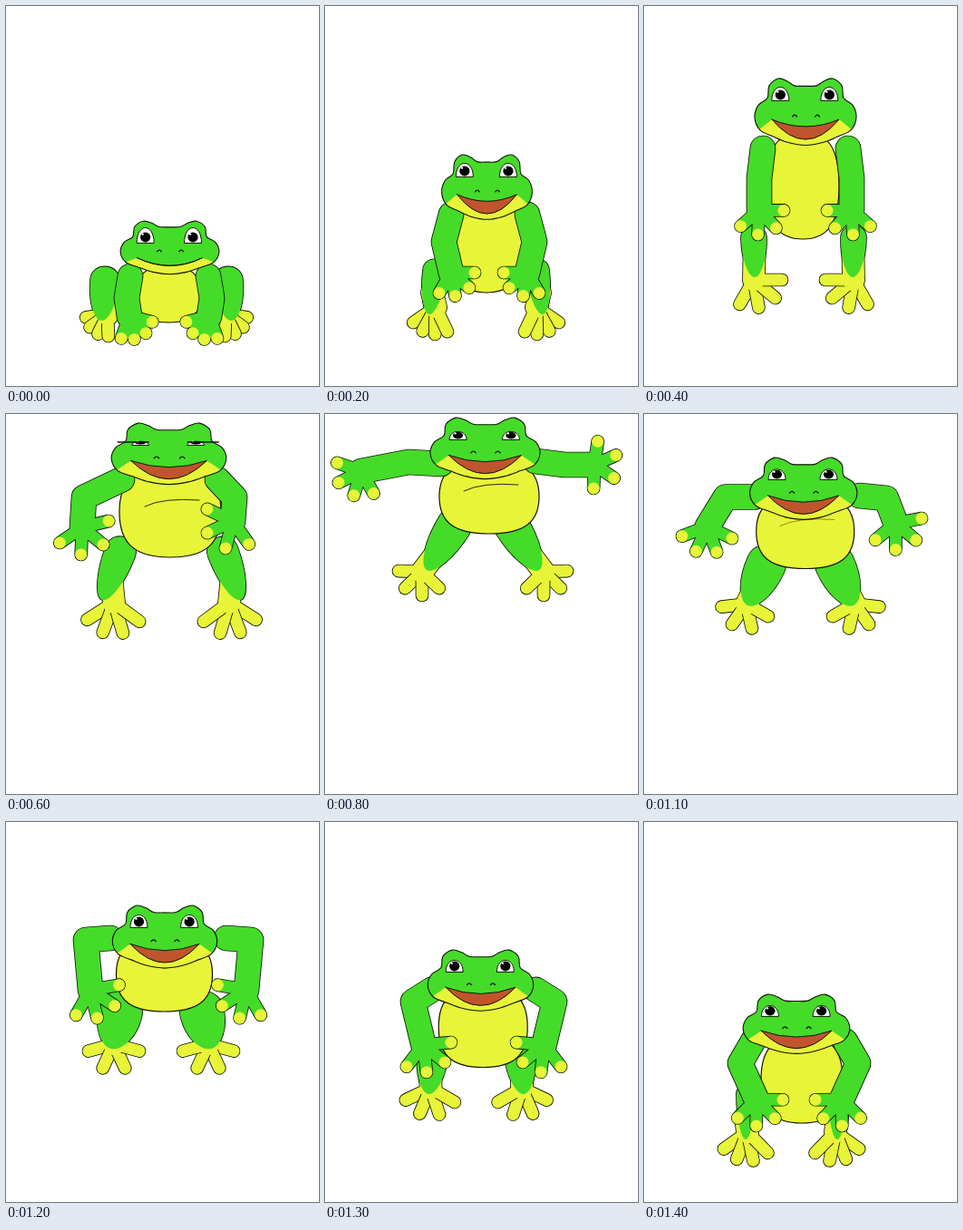
These frames come from a looping animation (345 px wide and 419 px high, 1500 ms). An HTML page:

```html
<!DOCTYPE html>
<html lang="en">
<head>
<meta charset="utf-8">
<title>Jumping frog</title>
<style>
html, body { margin: 0; width: 100%; height: 100%; overflow: hidden; background: #fff; }
svg { display: block; width: 100%; height: 100%; }
</style>
</head>
<body>
<svg id="stage" viewBox="0 0 345 419" stroke-linecap="round" stroke-linejoin="round"></svg>
<script>
const GREEN = '#45db29', YELLOW = '#e8f438', RED = '#c0542d', INK = '#101408';
const LOOP = 1500, STEP = 100, EDGE = 1.7;
const ARM = 27, SHIN = 24, DIGIT = 13;

// head: centre x, top y, x scale, y scale, mouth opening, eye height
// body: centre x, y, radius x, y        axes: mirror line of arms, of legs
// arm: shoulder, elbow, wrist, then the finger fan (angle, spread, length)
// leg: hip, thigh tip, ankle, then the toe fan, thigh half width
// The right limbs mirror the left ones unless given.
const squat = { t: 0, axes: [180, 177], head: [180.5, 238, .97, .78, 0, 17], body: [179, 318, 36, 31],
  arm: [137,298, 133,322, 136,342, 62, 32, 26],
  leg: [109,303, 105,347, 112,340, 130, 28, 24, 16] };
const rise = { t: 200, axes: [181, 177.5], head: [178.5, 165, .89, .95, 1, 15], body: [178, 262, 40, 54],
  arm: [139,230, 131,260, 139,294, 60, 40, 26],
  leg: [121,292, 115,340, 122,332, 105, 27, 30, 13] };
const stretch = { t: 400, axes: [178, 176], head: [178, 81, 1, .98, 1, 15], body: [175, 198, 40, 59],
  arm: [131,157, 127,190, 127,225, 70, 46, 27],
  leg: [121,256, 122,299, 121,302, 60, 40, 31, 14] };
const leap = { t: 600, axes: [180, 182.5], head: [179.5, 11, 1.13, .9, 1, 4], body: [181, 108, 56, 50], fold: 1,
  arm: [128,72, 86,92, 84,125, 66, 53, 30],
  armR: [233,72, 252,92, 250,118, 50, 50, 31],
  leg: [126,152, 106,205, 119,208, 92, 37, 35, 17] };
const apex = { t: 1000, axes: [174, 174], head: [176.5, 5, 1.08, .9, 1, 9], body: [181, 91, 55, 41], fold: 1,
  arm: [128,55, 92,53, 47,63, 130, 46, 28],
  armR: [232,52, 264,56, 290,56, 175, 58, 26],
  leg: [143,122, 112,172, 107,174, 113, 46, 26, 19] };
const fall = { t: 1200, axes: [179, 171], head: [175, 93, 1.03, .92, 1, 14], body: [174.5, 168, 53, 41],
  arm: [115,128, 88,130, 93,185, 55, 43, 32],
  leg: [126,210, 116,250, 119,245, 90, 50, 29, 24] };
const land = { t: 1400, axes: [171, 162.5], head: [168, 191, 1.05, .87, 1, 12], body: [174, 284, 45, 48],
  arm: [120,242, 106,266, 124,306, 68, 45, 29],
  leg: [112,300, 112,350, 114,342, 95, 33, 32, 10] };

const mirror = (limb, axis) => limb.map((v, i) => i < 6 && i % 2 === 0 ? 2 * axis - v : v);
const poses = [squat, rise, stretch, leap, { ...apex, t: 800, reach: 7 }, apex, fall, land].map(p => ({
  ...p, extra: [p.fold || 0, p.reach || 0],
  armR: p.armR || mirror(p.arm, p.axes[0]),
  legR: mirror(p.leg, p.axes[1])
}));

const stage = document.getElementById('stage');
function add(tag, attrs, parent = stage) {
  const el = document.createElementNS('http://www.w3.org/2000/svg', tag);
  set(el, attrs);
  return parent.appendChild(el);
}
function set(el, attrs) {
  for (const k in attrs) el.setAttribute(k, attrs[k]);
}
const draw = (el, d) => set(el, { d });
const fill = color => add('path', { fill: color });
const line = (color, width) => add('path', { fill: 'none', stroke: color, 'stroke-width': width });
const inked = (color, width) => add('path', { fill: color, stroke: INK, 'stroke-width': width });
const pt = (x, y) => `${x.toFixed(2)} ${y.toFixed(2)} `;

// Closed smooth curve through [x, y] points
function curve(pts) {
  const n = pts.length, at = i => pts[(i + n) % n];
  return 'M' + pt(...pts[0]) + pts.map((b, i) => {
    const a = at(i - 1), c = at(i + 1), e = at(i + 2);
    return 'C' + pt(b[0] + (c[0] - a[0]) / 6, b[1] + (c[1] - a[1]) / 6)
      + pt(c[0] - (e[0] - b[0]) / 6, c[1] - (e[1] - b[1]) / 6) + pt(...c);
  }).join('') + 'Z';
}

// Drop with a round top at the hip, narrowing to a soft tip
function drop(hx, hy, tx, ty, half) {
  const dx = tx - hx, dy = ty - hy, len = Math.hypot(dx, dy);
  const at = (along, side) => pt(hx + (dx * along - dy * side) / len, hy + (dy * along + dx * side) / len);
  const back = -half * 1.3, mid = len * .55, soft = half * .5;
  return 'M' + at(0, half) + 'C' + at(mid, half) + at(len, soft) + at(len, 0)
    + 'C' + at(len, -soft) + at(mid, -half) + at(0, -half)
    + 'C' + at(back, -half) + at(back, half) + at(0, half) + 'Z';
}

// Four digit tips fanned around a joint, outer one first
function fan(x, y, [angle, spread, len], dir) {
  return [1.5, .5, -.5, -1.5].map(k => {
    const a = (angle + k * spread) * Math.PI / 180;
    return [x + dir * Math.cos(a) * len, y + Math.sin(a) * len];
  });
}

function makeLeg(key, dir) {
  const shinEdge = line(INK, SHIN + EDGE), thighEdge = inked(INK, EDGE);
  const toes = [0, 1, 2, 3].map(() => [line(INK, DIGIT + EDGE), line(YELLOW, DIGIT)]);
  const shin = line(YELLOW, SHIN), thigh = fill(GREEN);
  return p => {
    const [hx, hy, tx, ty, ax, ay, ...rest] = p[key];
    const s = 'M' + pt((hx + tx) / 2, (hy + ty) / 2) + 'L' + pt(ax, ay);
    const g = drop(hx, hy, tx, ty, rest[3]);
    draw(shinEdge, s); draw(shin, s);
    draw(thighEdge, g); draw(thigh, g);
    fan(ax, ay, rest, dir).forEach((tip, i) =>
      toes[i].forEach(el => draw(el, 'M' + pt(ax, ay) + 'L' + pt(...tip))));
  };
}

function makeArm(key, dir) {
  const armEdge = line(INK, ARM + EDGE), handEdge = line(INK, DIGIT + EDGE);
  const fingers = line(GREEN, DIGIT), ends = line(YELLOW, DIGIT), arm = line(GREEN, ARM);
  return p => {
    const [sx, sy, ex, ey, wx0, wy, ...rest] = p[key];
    const wx = wx0 - dir * p.extra[1];
    const a = 'M' + pt(sx, sy) + 'L' + pt(ex, ey) + 'L' + pt(wx, wy);
    const tips = fan(wx, wy, rest, dir);
    const f = tips.map(tip => 'M' + pt(wx, wy) + 'L' + pt(...tip)).join('');
    draw(armEdge, a); draw(arm, a);
    draw(handEdge, f); draw(fingers, f);
    draw(ends, tips.map(tip => 'M' + pt(...tip) + 'h.01').join(''));
  };
}

function makeBody() {
  const belly = inked(YELLOW, 1.2), fold = line(INK, .9), k = .7;
  return p => {
    const [x, y, rx, ry] = p.body;
    const at = (u, v) => pt(x + u * rx, y + v * ry);
    draw(belly, 'M' + at(-1, 0) + 'C' + at(-1, -k) + at(-k, -1) + at(0, -1)
      + 'C' + at(k, -1) + at(1, -k) + at(1, 0) + 'C' + at(1, k) + at(k, 1) + at(0, 1)
      + 'C' + at(-k, 1) + at(-1, k) + at(-1, 0) + 'Z');
    draw(fold, 'M' + pt(x - 28, y - 6) + 'Q' + pt(x - 8, y - 16) + pt(x + 32, y - 13));
    set(fold, { opacity: p.extra[0] });
  };
}

function makeHead() {
  const half = [[12, 7], [20, 2], [30, -1], [40, 7], [42, 21], [52, 29], [56, 43], [50, 57], [36, 64], [19, 71]];
  const outline = [[0, 7.5], ...half, [0, 74], ...half.map(([u, v]) => [-u, v]).reverse()];
  const clip = add('path', {}, add('clipPath', { id: 'face' }));
  const skin = fill(GREEN), chin = fill(YELLOW);
  set(chin, { 'clip-path': 'url(#face)' });
  const mouth = inked(RED, 1), nose = line(INK, 1.2), rim = line(INK, 1.1);
  const eyes = [-1, 1].map(side => ({ side,
    white: inked('#fff', 1), pupil: add('ellipse', { fill: '#000', rx: 5.6 }),
    glint: add('circle', { fill: '#fff', r: 1.2 }), lash: line(INK, 1.3) }));
  return p => {
    const [cx, y0, sx, sy, open, eyeH] = p.head;
    const at = (u, v) => pt(cx + u * sx, y0 + v * sy);
    const shape = curve(outline.map(([u, v]) => [cx + u * sx, y0 + v * sy]));
    [clip, skin, rim].forEach(el => draw(el, shape));

    const shut = 1 - open, corner = 45 + 6 * shut, upper = 53 + 9 * shut, lower = 67.5 - 5.5 * shut;
    const lip = 'Q' + at(0, 2 * lower - corner) + at(37, corner);
    draw(chin, 'M' + at(-53, 58) + 'L' + at(-37, corner) + lip
      + 'L' + at(53, 58) + 'L' + at(53, 90) + 'L' + at(-53, 90) + 'Z');
    draw(mouth, 'M' + at(-37, corner) + lip + 'Q' + at(0, 2 * upper - corner) + at(-37, corner) + 'Z');
    draw(nose, [-12, 13].map(u => 'M' + at(u - 2.5, 42) + 'Q' + at(u, 38) + at(u + 2.5, 42)).join(''));

    const base = y0 + 23, ry = Math.min(5.5, eyeH * .42), lid = base - eyeH * 1.3;
    for (const { side, white, pupil, glint, lash } of eyes) {
      const x = cx + (side * 27 - .7) * sx, y = base - ry - .6;
      draw(white, 'M' + pt(x - 9.5, base) + 'C' + pt(x - 9.5, lid) + pt(x + 9.5, lid) + pt(x + 9.5, base) + 'Z');
      set(pupil, { cx: x, cy: y, ry });
      set(glint, { cx: x - 3, cy: y - ry * .6 });
      draw(lash, 'M' + pt(x + side * 25, base - 3) + 'L' + pt(x - side * 9, base - 3));
      set(lash, { opacity: Math.max(0, Math.min(1, (7 - eyeH) / 3)) });
    }
  };
}

const parts = [makeLeg('leg', 1), makeLeg('legR', -1), makeBody(),
  makeArm('arm', 1), makeArm('armR', -1), makeHead()];
const moving = ['head', 'body', 'arm', 'armR', 'leg', 'legR', 'extra'];

function poseAt(t) {
  const i = poses.findLastIndex(p => p.t <= t);
  const a = poses[i], b = poses[i + 1] || a;
  const k = a === b ? 0 : (t - a.t) / (b.t - a.t);
  return Object.fromEntries(moving.map(key => [key, a[key].map((v, j) => v + (b[key][j] - v) * k)]));
}

let shown = -1;
function render(ms) {
  const t = Math.floor(ms % LOOP / STEP) * STEP;
  if (t === shown) return;
  shown = t;
  const p = poseAt(t);
  parts.forEach(part => part(p));
}

const start = performance.now();
function tick() {
  render(performance.now() - start);
  requestAnimationFrame(tick);
}
tick();
</script>
</body>
</html>
```
